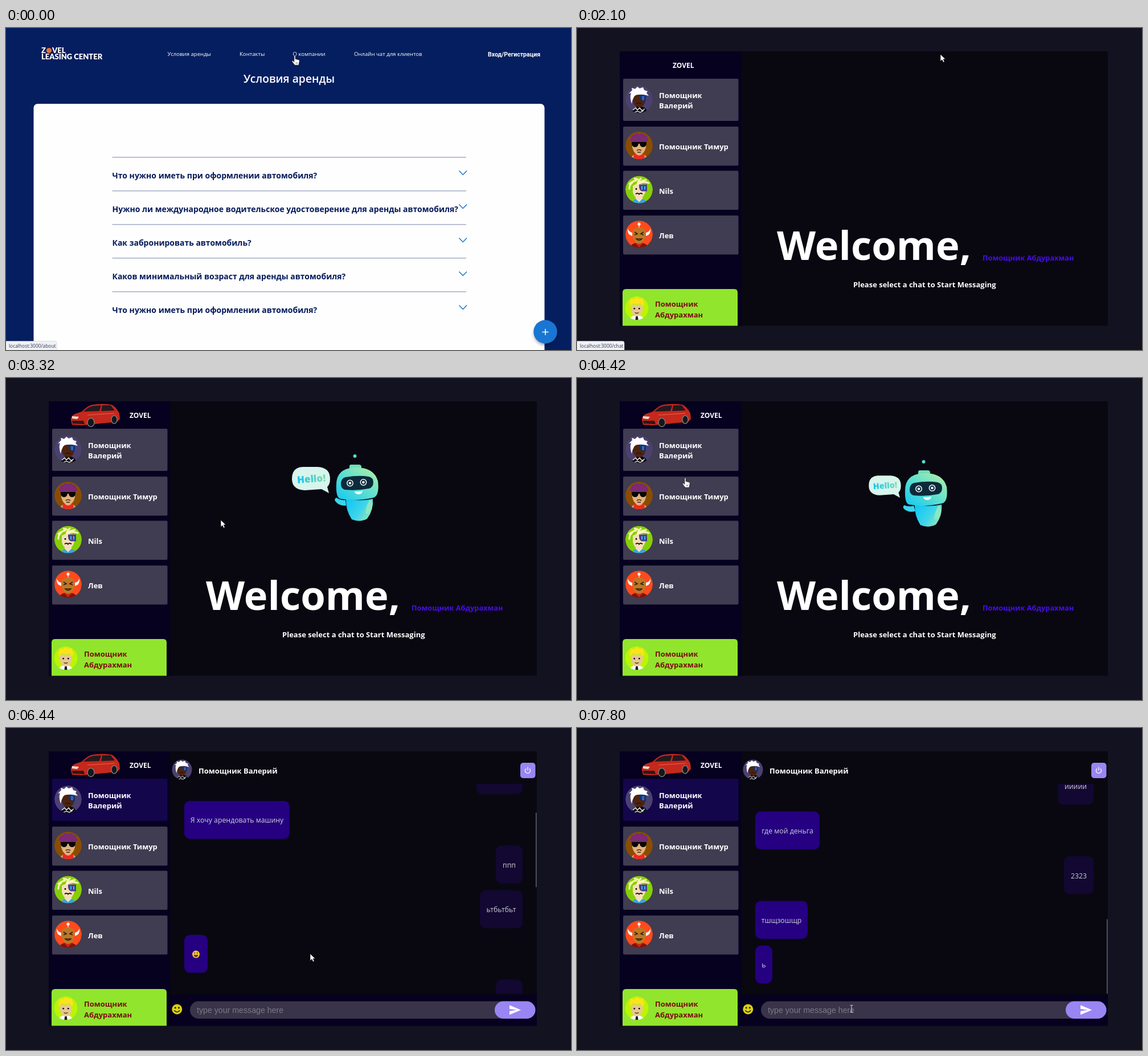
These frames come from a looping animation (992 by 565 pixels, 8000 ms). An HTML page:

```html
<!DOCTYPE html>
<html lang="ru">
<head>
<meta charset="utf-8">
<title>Аренда и чат</title>
<style>
html, body { margin: 0; width: 100%; height: 100%; overflow: hidden; background: #131220; }
svg { display: block; width: 100vw; height: 100vh; }
text { font-family: "Open Sans", "Noto Sans", sans-serif; white-space: pre; }
.b { font-weight: 700; font-size: 13px; fill: #fff; }
.nav { font-size: 9.6px; fill: #fff; }
.logo { font: 900 13px Lato, sans-serif; fill: #fff; }
.msg { font-size: 12.3px; fill: #d0cfd6; }
</style>
</head>
<body>
<svg viewBox="0 0 992 565" xmlns="http://www.w3.org/2000/svg">
<defs>
  <linearGradient id="mint" x1="0" y1="1" x2="1" y2="0">
    <stop offset="0" stop-color="#12c8f4"/><stop offset=".5" stop-color="#5fe0cf"/><stop offset="1" stop-color="#b9f0a0"/>
  </linearGradient>
  <linearGradient id="torso" x1="0" y1=".2" x2="1" y2=".8">
    <stop offset="0" stop-color="#12c8f4"/><stop offset=".55" stop-color="#3fd5ea"/><stop offset="1" stop-color="#9be9b4"/>
  </linearGradient>
  <linearGradient id="hello"><stop offset="0" stop-color="#12c4ee"/><stop offset="1" stop-color="#7fdcae"/></linearGradient>
  <clipPath id="round"><circle r="24"/></clipPath>
  <clipPath id="feed"><rect x="288" y="98" width="644" height="368"/></clipPath>
  <filter id="soft" x="-30%" y="-30%" width="160%" height="160%"><feGaussianBlur stdDeviation="2.5"/></filter>

  <g id="face1" clip-path="url(#round)">
    <circle r="24" fill="#4a4170"/>
    <path d="M-13 24q2-9 9-11h10q7 2 9 11z" fill="#0b0b10"/>
    <path d="M-11 19l5-4 3 4 4-4 4 5 5-3M-8 23l5-2 5 2 6-3" fill="none" stroke="#fff" stroke-width="1.3"/>
    <path d="M-11-6q11-9 22 0v9q-2 11-11 11t-11-11z" fill="#4c2310"/>
    <path d="M1-8h11v11q-9 0-11-5z" fill="#172f75"/><path d="M5-5h1v6h2v-6h1" stroke="#36a7f2" fill="none"/>
    <path d="M-5 8q5-3 9 0" stroke="#180a04" fill="none"/>
    <path d="M-13 8q-4-12-1-19l-4 1 6-6-1-4 6 2 4-4 4 3 6-2 2 5 6 2-2 3 4 5-4-1q-8-2-14-1-6 0-8 4-3 5-4 12z" fill="#fff"/>
  </g>
  <g id="face2" clip-path="url(#round)">
    <circle r="24" fill="#8a4d00"/>
    <path d="M-15 24q2-8 11-9h8q9 1 11 9z" fill="#d9a66c"/>
    <path d="M-10 24l1-9h3q6 6 12 0h3l1 9z" fill="#f0271c"/>
    <path d="M-12-8h24v11q-3 13-12 14-9-1-12-14z" fill="#e2b27c"/>
    <path d="M-13-6q-6-5-1-7-1-6 5-5 3-6 9-2 6-4 9 2 6-1 5 5 5 3-1 7z" fill="#7a2b72"/>
    <path d="M-13-6h26v3q-1 6-6 6t-6-6h-2q-1 6-6 6t-6-6z" fill="#070707"/>
    <path d="M-4 9q4-3 8 0M-3 12h6" stroke="#382010" fill="none" stroke-width="1.6"/>
  </g>
  <g id="face3" clip-path="url(#round)">
    <circle r="24" fill="#86cf08"/>
    <path d="M-13 24q2-7 10-8h7q8 1 10 8z" fill="#3aa4dc"/><path d="M-6 16L0 22l6-6v-4H-6z" fill="#f3dfbd"/>
    <path d="M-11-7q11-7 22 0v11q-3 11-11 12-9-1-11-12z" fill="#f4deb9"/>
    <path d="M0-9h14v12H5Q0 1 0-5z" fill="#493e8c"/><path d="M5-6v6m5-6v6" stroke="#45b5ff" stroke-width="2"/>
    <circle cx="-5" cy="-1" r="1.4"/><path d="M-6 8q3-3 6 0 3-3 6 0" stroke="#20170d" fill="none" stroke-width="2"/>
    <path d="M-17 0q-1-8 6-13M-18-9q6-6 14-7M-9-19Q0-20 2-11M4-20q-6 4-7 11M13-17Q2-16-2-10M18-11Q8-16-2-10" stroke="#fdf4b5" fill="none" stroke-width="3"/>
  </g>
  <g id="face4" clip-path="url(#round)">
    <circle r="24" fill="#ff4a1c"/>
    <path d="M-17 24q3-7 11-9H6q8 2 11 9z" fill="#7c150d"/><path d="M-7 15L0 23l7-8z" fill="#ca2618"/>
    <path d="M-11-7Q0-18 11-7v12Q8 16 0 17q-8-1-11-12z" fill="#bd7727"/>
    <path d="M-12 3q-9-2-8-13 3 7 8 7zM12 3q9-2 8-13-3 7-8 7z" fill="#fff"/>
    <circle cy="-18" r="2.6" fill="#fff"/><path d="M0-16v4" stroke="#fff"/>
    <path d="M-8-4l5 3-5 2M8-4L3-1l5 2M-5 8q5 5 10 0z" stroke="#351b08" fill="none" stroke-width="1.6"/>
  </g>
  <g id="face5" clip-path="url(#round)">
    <circle r="24" fill="#bdf400"/>
    <path d="M-15 24q1-7 11-9h8q10 2 11 9z" fill="#fff"/><path d="M-2 17h4l1 7h-6z" fill="#151515"/>
    <path d="M-12-7h24v11q-3 12-12 13-9-1-12-13z" fill="#e8c791"/>
    <path d="M-14-3q-3-9 2-13l-1-4 7 2 7-5 4 4 7-1 1 5q4 5 0 12l-5-7-8 2-8-2z" fill="#ffe21b"/>
    <circle cx="-5" cy="1" r="1.6"/><circle cx="5" cy="1" r="1.6"/><path d="M-4 9q4 3 8 0" stroke="#4a2e14" fill="none" stroke-width="1.5"/>
  </g>
  <g id="arrow"><path d="M0 0v12.4l3-2.7 2 4.6 2.3-1-2-4.5h3.8z" fill="#fff" stroke="#000" stroke-width=".7"/></g>
  <g id="hand"><path d="M-1.2.5q1.4-1.2 2.4 0v5.8l6 1.5q1.5.5 1 3l-1.2 6.4h-7L-4.8 11q-.7-2 1.3-1.7l2.3 2z" fill="#fff" stroke="#111" stroke-width=".8"/><path d="M2.3 12v3m2-3v3" stroke="#222" stroke-width=".6"/></g>
  <g id="ibeam"><path d="M-2.5-6h2l.5.7.5-.7h2M0-5.3V5.3M-2.5 6h2l.5-.7.5.7h2" fill="none" stroke="#d8d8d8"/></g>
</defs>

<g id="faqPage">
  <rect width="992" height="565" fill="#051e5f"/>
  <text class="logo" x="62" y="44">Z</text><circle cx="75.5" cy="39.5" r="4.6" fill="#e2733d"/>
  <text class="logo" x="81" y="44">VEL</text><text class="logo" x="62" y="55">LEASING CENTER</text>
  <text class="nav" x="283.5" y="48.5">Условия аренды</text>
  <text class="nav" x="410" y="48.5">Контакты</text>
  <text class="nav" x="503.5" y="48.5">О компании</text>
  <text class="nav" x="611" y="48.5">Онлайн чат для клиентов</text>
  <text x="846" y="50" style="font:700 10.6px Roboto,sans-serif" fill="#fff">Вход/Регистрация</text>
  <text x="497" y="96" text-anchor="middle" font-size="19.3" font-weight="600" fill="#fff">Условия аренды</text>
  <rect x="48.5" y="133" width="897" height="450" rx="7" fill="#fefefe"/>
  <g id="questions"></g>
  <circle cx="947" cy="536" r="20.5" opacity=".35" filter="url(#soft)"/>
  <circle cx="947" cy="533" r="20.7" fill="#1976d2"/>
  <path d="M941.5 533.5h11m-5.5-5.5v11" stroke="#fff" stroke-width="1.5"/>
</g>

<g id="chatPage">
  <rect width="992" height="565" fill="#131220"/>
  <rect x="75" y="41" width="857" height="481.5" fill="#090811"/>
  <rect x="75" y="41" width="213.5" height="481.5" fill="#06011f"/>
  <g id="car">
    <path d="M114 74q-1-7 7-11l12-4q10-10 18-12 18-3 35 0 8 5 13 15l1 10-5 5-62 6-17-1z" fill="#c5281c"/>
    <path d="M136 59q9-9 17-10l14-1-3 10zM169 48h15l7 9-24 1z" fill="#24191d"/>
    <path d="M116 67l12 1-3 4-9-1z" fill="#eee2d4"/><path d="M116 75h20l2 6-21-1z" fill="#2c1616"/>
    <path d="M143 65l47-3" stroke="#ed6550"/>
    <g fill="#17161b" stroke="#777" stroke-width="1.5"><ellipse cx="149" cy="78" rx="6" ry="7.5"/><ellipse cx="190" cy="73" rx="5" ry="7"/></g>
  </g>
  <text id="brand" class="b" y="70" style="font-size:12px">ZOVEL</text>
  <g id="contacts"></g>
  <path d="M80 522.5V464q0-6 6-6h190q6 0 6 6v58.5z" fill="#92e52d"/>
  <use href="#face5" transform="translate(105 491.5) scale(.86)"/>
  <g fill="#7a0d12"><text class="b" x="137" y="489" style="fill:inherit">Помощник</text><text class="b" x="137" y="507.5" style="fill:inherit">Абдурахман</text></g>

  <g id="welcome">
    <g id="robot">
      <circle cx="612.5" cy="137" r="3" fill="#55dcc8"/>
      <path d="M603 160v-5q0-3 3-3h14q3 0 4 3v5z" fill="#70dfb8"/>
      <path id="arm" d="M596 214q-9 1-16-4-4 2-2 6 7 9 19 8z" fill="#3bd4ea"/>
      <path d="M597 212q24 5 47 0 2 19-10 35-13 7-27 1-11-17-10-36z" fill="url(#torso)"/>
      <path d="M641 214q4 8 0 18-5 9-10 5 1-12 7-22z" fill="#8fe6c0"/>
      <path d="M580 187q0-27 30-30 36-2 43 24 3 26-8 29-30 7-58 2-8-2-7-25z" fill="url(#mint)"/>
      <path d="M588 186q0-10 8-12 23-4 41-1 8 2 8 10 0 9-8 11-21 4-42 2-7-2-7-10z" fill="#0c2a3c"/>
      <g fill="none" stroke="#f3fff8" stroke-width="1.5"><circle cx="604" cy="184.5" r="5.2"/><circle cx="627.5" cy="183" r="5.2"/></g>
      <g fill="#fff"><circle cx="604" cy="184.5" r="2.3"/><circle cx="627.5" cy="183" r="2.3"/><path d="M612 199q7 1 14-1-1 6-7 6-6 0-7-5z"/></g>
    </g>
    <g id="bubble">
      <path d="M-46-46h26q22 1 22 21 0 10-5 14L0 0-13-7-42-5q-23-1-23-20 0-20 19-21z" fill="#d7f5ec"/>
      <text x="-56" y="-19" transform="rotate(-4 -32 -24)" font-size="17" font-weight="800" fill="url(#hello)">Hello!</text>
    </g>
    <text class="b" x="351" y="407" style="font-size:70.5px">Welcome,</text>
    <text class="b" x="712" y="408" style="fill:#480ce8;font-size:12.8px">Помощник Абдурахман</text>
    <text class="b" x="485" y="455">Please select a chat to Start Messaging</text>
  </g>

  <g id="talk">
    <g clip-path="url(#feed)">
      <g id="messages"></g>
      <rect id="thumb" x="929.8" width="2.2" height="130.5" fill="#4b4856"/>
    </g>
    <rect x="288.5" y="468" width="643.5" height="54.5" fill="#06011f"/>
    <g id="panel">
      <use href="#face1" transform="translate(309 75) scale(.74)"/>
      <text class="b" x="338" y="82">Помощник Валерий</text>
      <rect x="903" y="63" width="26.5" height="27" rx="5" fill="#9a86f3"/>
      <path d="M913 73.3a4.6 4.6 0 1 0 6 0M916 70.5v6" fill="none" stroke="#fff" stroke-width="1.2"/>
      <circle cx="300.3" cy="495.5" r="9" fill="#dccf10"/>
      <circle cx="297.2" cy="493" r="1.4" fill="#111"/><circle cx="303.4" cy="493" r="1.4" fill="#111"/>
      <path d="M295.5 497.5q5 6 9.6 0" fill="none" stroke="#111" stroke-width="1.3"/>
      <rect x="323" y="481.5" width="606" height="30.5" rx="15" fill="#393449"/>
      <text x="335" y="501.5" style="font:14.2px 'Liberation Sans',Arial,sans-serif" fill="#7c7886">type your message here</text>
      <rect x="858" y="481.5" width="71.5" height="30.5" rx="15.2" fill="#9a86f3"/>
      <path d="M884 488.3l20 8.5-20 8.5v-6.6l13-1.9-13-1.9z" fill="#fff"/>
    </g>
  </g>
</g>

<g id="status">
  <path id="statusBox" fill="#eff1f5" stroke="#c9ccd3" stroke-width=".6"/>
  <text id="statusText" x="5" y="560.5" font-size="8.4" fill="#333b55"></text>
</g>
<use id="cursor"/>
</svg>
<script>
const $ = id => document.getElementById(id);
const show = (id, on) => $(id).setAttribute('display', on ? 'inline' : 'none');
const move = (id, x, y, extra = '') => $(id).setAttribute('transform', `translate(${x} ${y}) ${extra}`);
const smooth = u => { u = Math.min(1, Math.max(0, u)); return u * u * (3 - 2 * u); };

const LOOP = 8000, OPEN_CHAT = 1770, IMAGES = 2300, OPEN_TALK = 5250, FEED = 5900;
const PITCH = 78.4, MAX_SCROLL = 674;

$('questions').innerHTML = [
  'Что нужно иметь при оформлении автомобиля?',
  'Нужно ли международное водительское удостоверение для аренды автомобиля?',
  'Как забронировать автомобиль?',
  'Каков минимальный возраст для аренды автомобиля?',
  'Что нужно иметь при оформлении автомобиля?'
].map((q, i) => `<g transform="translate(0 ${i * 59})">
  <path d="M186.5 226.8h621.5" stroke="#a6adc6" stroke-width="1.5"/>
  <text class="b" x="186.5" y="263.5" style="font-size:14px;fill:#051a5a">${q}</text>
  <path d="M795.5 250.5l6.8 7 6.8-7" fill="none" stroke="#1976d2" stroke-width="1.5"/></g>`).join('');

const contacts = [
  [89, 74, 'Помощник', 'Валерий'],
  [173, 68.5, 'Помощник Тимур'],
  [250.5, 68.5, 'Nils'],
  [329, 68.5, 'Лев']
];
$('contacts').innerHTML = contacts.map(([y, h, a, b], i) => `
  <rect id="contact${i}" x="81" y="${y}" width="202.5" height="${h}" rx="2" fill="#403c51"/>
  <use href="#face${i + 1}" transform="translate(109 ${y + (b ? 36 : 33)})"/>
  <text class="b" x="144" y="${y + (b ? 33.5 : 40)}">${a}</text>
  ${b ? `<text class="b" x="144" y="${y + 52}">${b}</text>` : ''}`).join('');

// Each message: side, bubble width, text (empty text is a smiley)
const messages = [
  ['R', 47, 'ппп'], ['R', 81, 'апрорпа'], ['L', 185, 'Я хочу арендовать машину'],
  ['R', 47, 'ппп'], ['R', 75, 'ьтбьтбьт'], ['L', 41, ''], ['R', 47, 'ооо'],
  ['R', 63, 'иииии'], ['R', 63, 'иииии'], ['L', 113, 'где мой деньга'],
  ['R', 52, '2323'], ['L', 92, 'тшщзошщр'], ['L', 30, 'ь']
];
const smiley = `<circle cx="333.5" cy="34" r="6.5" fill="#f7c733"/>
  <path d="M331.3 30.5v2.5m4.4-2.5v2.5" stroke="#432" stroke-width="1.3"/><path d="M329.5 35h8q-1 4-4 4t-4-4z" fill="#633"/>`;
$('messages').innerHTML = messages.map(([side, w, text], i) => {
  const left = side === 'L', x = left ? 313 : 907 - w;
  return `<g transform="translate(0 ${115 + i * PITCH})">
    <rect x="${x}" width="${w}" height="66.5" rx="10" fill="${left ? '#250081' : '#120832'}"/>
    ${text ? `<text class="msg" x="${x + w / 2}" y="38.5" text-anchor="middle">${text}</text>` : smiley}</g>`;
}).join('');

// Pointer stops: time, x, y
const stops = [
  [0, 507, 48], [820, 626, 46], [890, 636, 46], [1569, 636, 46], [1570, 634, 36], [1769, 634, 36],
  [1770, 638, 46], [2300, 638, 46], [2590, 632, 57], [3300, 377, 249], [3430, 377, 249],
  [4210, 190, 175], [4430, 190, 175], [5000, 190, 139], [5250, 192, 142],
  [5800, 327, 195], [5900, 327, 195], [6400, 534, 396], [6700, 534, 396], [7480, 482, 492.5], [LOOP, 482, 492.5]
];
function pointerAt(t) {
  const i = stops.findIndex(s => s[0] > t), [t0, x0, y0] = stops[i - 1], [t1, x1, y1] = stops[i];
  const k = smooth((t - t0) / (t1 - t0));
  return [x0 + (x1 - x0) * k, y0 + (y1 - y0) * k];
}

function draw(t) {
  const chat = t >= OPEN_CHAT, images = t >= IMAGES, talk = t >= OPEN_TALK, feed = t >= FEED;
  show('faqPage', !chat);
  show('chatPage', chat);
  show('car', images);
  show('robot', images);
  show('bubble', images);
  show('welcome', !talk);
  show('talk', talk);
  $('brand').setAttribute('x', images ? 217 : 168);
  $('contact0').setAttribute('fill', talk ? '#14064b' : '#403c51');

  const dip = 7 - 7 * Math.cos((t - 3280) / 3400 * 2 * Math.PI);
  move('robot', -.37 * dip, dip * .95);
  $('arm').setAttribute('transform', `rotate(${-dip} 596 219)`);
  move('bubble', 567, 202 + .75 * dip, `scale(${1 - .015 * dip})`);

  const scroll = smooth((t - 5864) / 1936) * MAX_SCROLL;
  show('messages', feed);
  show('thumb', feed);
  move('messages', 0, -scroll);
  $('thumb').setAttribute('y', 98 + scroll / MAX_SCROLL * 237.5);
  move('panel', 0, feed ? -2 : 0);

  const [x, y] = pointerAt(t);
  const toChat = x > 605 || chat;
  show('status', !images);
  $('statusText').textContent = 'localhost:3000/' + (toChat ? 'chat' : 'about');
  $('statusBox').setAttribute('d', `M0 549.5h${toChat ? 80 : 86}q3 0 3 3v13H0z`);

  const shape = !chat || x < 284 ? 'hand' : y > 478 ? 'ibeam' : 'arrow';
  show('cursor', t < 1040 || t >= 1570);
  $('cursor').setAttribute('href', '#' + shape);
  move('cursor', x, y);
}

function tick() {
  draw(performance.now() % LOOP);
  requestAnimationFrame(tick);
}
tick();
</script>
</body>
</html>
```
